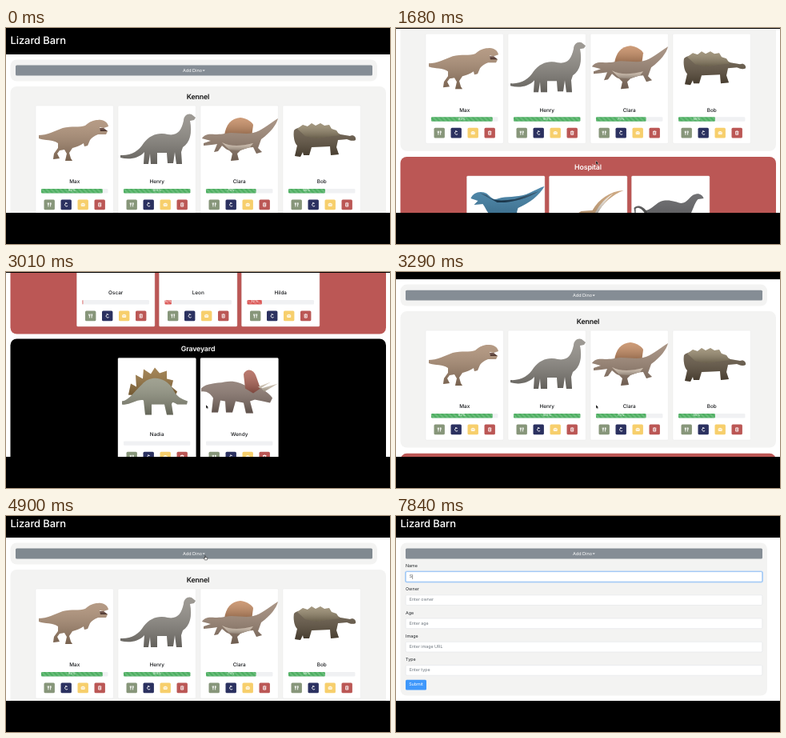
An HTML page that plays this animation: 480x270 px, repeating every 8 s.

```html
<!DOCTYPE html>
<html lang="en">
<head>
<meta charset="utf-8">
<title>Lizard Barn</title>
<style>
  html, body { margin: 0; width: 100%; height: 100%; overflow: hidden; background: #000; }
  svg { display: block; width: 480px; height: 270px; }
  text { font-family: Inter, "Open Sans", sans-serif; text-rendering: geometricPrecision; dominant-baseline: central; }
</style>
</head>
<body>
<svg id="stage" viewBox="0 0 480 270"></svg>
<script>
const LOOP = 8000, STRIPE = 5.8, FORM_HEIGHT = 164;
const GREEN = '#4cae60', RED = '#db5553';

// Each animal is a short list of [colour, outline] in card coordinates.
const animals = {
  tyrannosaur: [['#a98a70', 'M4 37C14 37 24 32 34 28C45 25 55 28 62 25C68 20 72 18 78 18C85 17 90 21 91 26L85 28L80 27L81 31L90 32L88 36L78 36C73 38 70 40 68 43L65 50L61 51L60 47C56 50 50 52 46 53L42 59L44 66L46 69L37 69L39 60L36 55L30 56L27 60L30 66L22 67L23 60L28 53L28 47C22 42 12 44 4 41Z'],
    ['#5d3d33', 'M80 28L85 28L90 32L81 32Z']],
  brachiosaur: [['#8d8982', 'M3 62C16 63 26 57 32 47C40 36 52 33 62 36C74 38 79 32 82 19C82 12 88 9 92 11L97 15L95 18L90 19C93 34 90 46 81 52L79 58L80 73L73 73L71 58L69 72L62 72L61 59L49 59L49 73L41 73L40 60L38 73L32 73L33 58C26 66 14 68 3 65Z']],
  spinosaur: [['#c58a60', 'M30 37C32 24 38 16 50 15C58 16 64 20 66 24L64 39Z'],
    ['#9b8371', 'M2 41C5 36 10 35 18 36C26 36 30 35 38 34C48 34 58 36 66 34C76 32 84 24 97 16C95 24 88 33 76 42L72 53L77 58L70 60L66 52C60 52 56 54 50 56L46 60L48 68L38 69L40 60L36 56C32 55 30 52 27 50L22 57L17 58L21 48L14 49L4 50L4 47L13 44Z'],
    ['#cdbba9', 'M27 46C36 51 50 51 66 47L62 52L48 56L36 55Z']],
  ankylosaur: [['#5f513e', 'M14 31C18 26 26 28 34 25L66 33L72 36L84 38C88 36 92 39 91 43C87 45 83 43 80 42L69 43L67 52L70 61L60 62L59 51L36 52L33 62L26 62L25 58L22 64L15 63L18 50C14 46 13 37 14 31Z'],
    ['#94866a', 'M18 29L25 24L31 26L36 22L41 25L47 22L52 25L58 24L61 29L67 31L71 37L54 39L42 41L28 38Z']],
  raptor: [['#32759d', 'M5 28C8 20 18 18 25 22C31 27 33 31 40 28C50 25 62 27 74 23C84 19 90 15 97 13C91 24 78 34 64 40C60 50 66 56 60 62L64 68L54 68L52 56L44 50L38 58L40 68L31 68L33 52C26 48 24 40 20 35L9 36L14 31Z'],
    ['#1d4460', 'M16 21L25 24C32 32 44 31 60 29L90 19C76 29 52 34 38 33Z']],
  pterosaur: [['#c59a6d', 'M93 18C76 19 62 29 54 43L40 44L18 58L44 60L60 70L60 47C67 34 78 24 93 18Z'],
    ['#eee6dc', 'M80 22C71 27 63 35 57 47L60 48C65 38 72 29 80 22Z']],
  diplodocus: [['#58585b', 'M17 43C24 43 28 36 36 32C46 28 56 33 62 34C70 34 73 24 79 23C84 21 89 24 90 28L83 29C78 34 76 46 70 54L70 70L64 70L62 56L46 56L44 70L38 70L36 54C28 54 22 48 17 43Z'],
    ['#444', 'M20 46C14 36 6 36 3 40L4 46L5 46L5 41C8 38 13 40 18 49Z']],
  stegosaur: [['#94703a', 'M13 46L16 32L23 36L22 21L31 26L32 14L41 20L46 12L52 19L61 16L61 26L69 28L67 36L74 42L70 50Z'],
    ['#90927f', 'M5 54C14 53 20 42 30 33C42 20 60 25 68 38C74 50 80 51 87 54L86 58L74 58C70 56 68 54 67 58L69 71L61 71L58 58L42 58L42 71L34 71L32 53C24 51 14 60 5 58Z']],
  triceratops: [['#86736a', 'M1 38C8 31 20 32 30 30C42 28 50 31 57 35L62 30L72 33C78 40 86 44 90 50L87 56L78 54L68 52L62 54L66 69L57 69L54 56L44 54L40 68L32 68L31 54L25 53L22 68L14 68L16 50C12 44 8 41 1 42Z'],
    ['#b06456', 'M56 38L54 20C58 13 66 13 70 24L75 38L66 44Z'],
    ['#d8cbb8', 'M76 38L97 32L80 42ZM72 36L88 30L75 38Z']]
};
const icons = [
  ['#87967a', 'M-2-2.4V-.6H-.6V-2.4M-1.3-1V2.6M1.4-2.5V2.6M1.9-2.3V0'],
  ['#2b3160', 'M1.6-1.5A2 2 0 1 0 2 1.4M-1-2.6L.6-1.5'],
  ['#f7cf6c', 'M-2-1H2V1.6H-2ZM-1-1.5H1M-1.5 .4H1.5'],
  ['#bb5755', 'M-2.2-1.7H2.2M-1.5-1.2V2.2H1.5V-1.2M-.5-2.4H.5M0-.6V1.4']
];
const sections = [
  { title: 'Kennel', y: 73, fill: '#f3f3f2', ink: '#111', left: 37, cards: [
    ['Max', 92, 'tyrannosaur'], ['Henry', 100, 'brachiosaur'], ['Clara', 75, 'spinosaur'], ['Bob', 55, 'ankylosaur']] },
  { title: 'Hospital', y: 250.7, fill: '#bb5755', ink: '#fff', left: 88.5, cards: [
    ['Oscar', 1, 'raptor'], ['Leon', 10, 'pterosaur'], ['Hilda', 22, 'diplodocus']] },
  { title: 'Graveyard', y: 427, fill: '#000', ink: '#fff', left: 140, cards: [
    ['Nadia', 0, 'stegosaur'], ['Wendy', 0, 'triceratops']] }
];

const rect = (x, y, w, h, fill, r = 0, extra = '') =>
  `<rect x="${x}" y="${y}" width="${w}" height="${h}" rx="${r}" fill="${fill}" ${extra}/>`;
const text = (x, y, size, fill, str, extra = '') =>
  `<text x="${x}" y="${y}" font-size="${size}" fill="${fill}" ${extra}>${str}</text>`;
const MID = 'text-anchor="middle"';

function bar(value) {
  const w = 83.4 * value / 100;
  return rect(7, 104, 83.4, 5.4, '#f0f1f3', 1.2) +
    rect(7, 104, w, 5.4, value > 50 ? GREEN : RED, 1.2) +
    rect(7, 104, w, 5.4, 'url(#stripes)', 1.2) +
    (value > 5 ? text(7 + w / 2, 106.9, 4.2, '#fff', value + '%', MID) : '');
}

function card([name, value, animal], x, y) {
  const picture = animals[animal].map(([fill, d]) =>
    `<path d="${d}" fill="${fill}"/><path d="${d}" fill="url(#shade)"/>`).join('');
  const buttons = icons.map(([fill, d], i) =>
    `<g transform="translate(${17.2 + i * 21} 123.8)">${rect(-6.7, -6.4, 13.4, 12.8, fill, 1.5)}
     <path d="${d}" fill="none" stroke="#fff" stroke-width=".9"/></g>`).join('');
  return `<g transform="translate(${x} ${y})">
    ${rect(0, 0, 97.4, 137, '#fff', 1.4, 'stroke="#e6e6e6" stroke-width=".4"')}
    ${picture}${text(48.7, 95.4, 6.4, '#16181b', name, MID + ' font-weight="500"')}${bar(value)}${buttons}</g>`;
}

const section = ({ title, y, fill, ink, left, cards }) =>
  rect(5.5, y, 469.5, 170.5, fill, 8) +
  text(240, y + 13.2, 8.8, ink, title, MID + ' font-weight="600" letter-spacing="-.15"') +
  cards.map((c, i) => card(c, left + i * 103, y + 24)).join('');

const fields = ['Name', 'Owner', 'Age', 'Image', 'Type'].map((label, i) => {
  const y = 69 + i * 29.25;
  const hint = 'Enter ' + (label === 'Image' ? 'image URL' : label.toLowerCase());
  return text(12, y, 5.4, '#212529', label) +
    rect(12.2, y + 6.6, 445.6, 12.6, '#fff', 1.4, 'stroke="#d5d9dd" stroke-width=".4"') +
    text(16.8, y + 13.1, 5.3, '#6c757d', hint, i ? '' : 'id="hint"');
}).join('');

const stage = document.getElementById('stage');
stage.innerHTML = `<defs>
  <clipPath id="view">${rect(0, 1, 480, 230, '#fff')}</clipPath>
  <linearGradient id="shade" x2="0" y2="1">
    <stop stop-color="#fff" stop-opacity=".15"/><stop offset="1" stop-opacity=".3"/></linearGradient>
  <pattern id="stripes" y="104" width="${STRIPE}" height="${STRIPE}" patternUnits="userSpaceOnUse">
    <path d="M0 2.9V5.8H2.9ZM0 0H2.9L5.8 2.9V5.8Z" fill="#fff" fill-opacity=".17"/></pattern></defs>
  <g clip-path="url(#view)">${rect(0, 0, 480, 231, '#fff')}
    <g id="page">
      ${rect(0, -10, 480, 43, '#000')}
      ${text(5.5, 16.1, 13, '#fff', 'Lizard Barn', 'font-weight="500" letter-spacing="-.1"')}
      ${rect(5.5, 39.5, 458.5, 27, '#f3f3f2', 8, 'id="panel"')}
      ${rect(11.6, 46.2, 446.8, 13.6, 'none', 2, 'id="buttonRing" stroke="#868e96" stroke-opacity=".5" stroke-width="1.3"')}
      ${rect(12, 46.6, 446, 12.8, '#858d95', 1.5)}
      ${rect(12, 46.6, 446, 12.8, '#5a6268', 1.5, 'id="hover"')}
      ${text(221, 53.6, 5.5, '#fff', 'Add Dino')}
      <path d="M245.6 52.4h3.2l-1.6 1.7z" fill="#fff"/>
      <g id="form">${fields}
        <g id="inputRing" fill="none">
          ${rect(11.6, 75, 446.8, 13.8, 'none', 2, 'stroke="#007bff" stroke-opacity=".25" stroke-width="1.2"')}
          ${rect(12.2, 75.6, 445.6, 12.6, 'none', 1.4, 'stroke="#7db8fb" stroke-width=".6"')}</g>
        ${text(16.8, 82.1, 5.3, '#495057', 'S', 'id="typed"')}
        ${rect(0, 79.2, .45, 5.8, '#222', 0, 'id="caret"')}
        ${rect(12, 210.8, 26, 12.6, '#3f98fb', 1.5)}
        ${text(25, 217.2, 5.4, '#fff', 'Submit', MID)}</g>
      <g id="below">${sections.map(section).join('')}</g>
    </g>
    <g id="cursor">
      <path id="arrow" d="M0 0V4.6L1.1 3.7L1.8 5.3L2.6 5L1.9 3.4H3.3Z" fill="#000" stroke="#fff" stroke-width=".35"/>
      <path id="hand" d="M-.5-1.5C-.5-2.2 .4-2.2 .4-1.5V.2L2.6 .7C3 1 2.8 2 2.3 3.4H-.5L-2 1.4C-1.8 .7-1.2 .9-.5 1.5Z" fill="#fff" stroke="#000" stroke-width=".5"/>
      <path id="beam" d="M-1.2-2.8Q0-2.8 0-2V2Q0 2.8-1.2 2.8M1.2-2.8Q0-2.8 0-2M0 2Q0 2.8 1.2 2.8" fill="none" stroke="#333" stroke-width=".5"/>
    </g>
  </g>`;

const el = Object.fromEntries([...stage.querySelectorAll('[id]')].map(n => [n.id, n]));
const show = (node, on) => node.setAttribute('visibility', on ? 'visible' : 'hidden');
const move = (node, x, y) => node.setAttribute('transform', `translate(${x} ${y})`);
const ramp = (t, from, to) => Math.min(1, Math.max(0, (t - from) / (to - from)));
const smooth = p => p * p * (3 - 2 * p);

// Interpolates [time, value] keys, holding the ends.
function track(keys, t, ease = p => p) {
  const i = keys.findIndex(k => k[0] > t);
  if (i < 0) return keys[keys.length - 1][1];
  if (!i) return keys[0][1];
  const [t0, a] = keys[i - 1], [t1, b] = keys[i];
  return a + (b - a) * ease((t - t0) / (t1 - t0));
}
const scrollKeys = [[840, 0], [1050, 20], [1260, 38], [1400, 40], [1470, 40], [1540, 50], [1680, 89],
  [1860, 220], [2030, 349], [2150, 367], [2310, 371], [2940, 371], [3010, 345], [3150, 150],
  [3290, 24], [3430, 12], [3780, 6]];
const cursorX = [[100, 256], [800, 250], [3850, 250], [4760, 249], [5880, 249], [6300, 166.5]];
const cursorY = [[100, 236], [800, 166], [3850, 166], [4760, 51.5], [5880, 51.5], [6300, 75]];

function render(t) {
  const open = t >= 5180, typed = t >= 7840;
  move(el.page, 0, -track(scrollKeys, t));
  move(el.below, 0, open ? FORM_HEIGHT : 0);
  el.panel.setAttribute('height', open ? 27 + FORM_HEIGHT : 27);
  el.stripes.setAttribute('x', STRIPE * (1 - t % 1000 / 1000));

  el.hover.setAttribute('opacity', .45 * (ramp(t, 4860, 5040) - ramp(t, 5980, 6130)));
  el.buttonRing.setAttribute('opacity', ramp(t, 5130, 5390) - ramp(t, 6700, 6930));
  el.inputRing.setAttribute('opacity', ramp(t, 6680, 6930));
  show(el.form, open);
  show(el.hint, open && !typed);
  show(el.typed, typed);
  show(el.caret, typed || (t >= 6720 && t < 7280));
  el.caret.setAttribute('x', typed ? 20.6 : 16.6);

  const hand = t >= 4760 && t < 5980, beam = t >= 6440;
  move(el.cursor, track(cursorX, t, smooth), track(cursorY, t, smooth));
  show(el.arrow, !hand && !beam);
  show(el.hand, hand);
  show(el.beam, beam && !typed);
}

const start = performance.now();
(function tick() {
  render((performance.now() - start) % LOOP);
  requestAnimationFrame(tick);
})();
</script>
</body>
</html>
```
